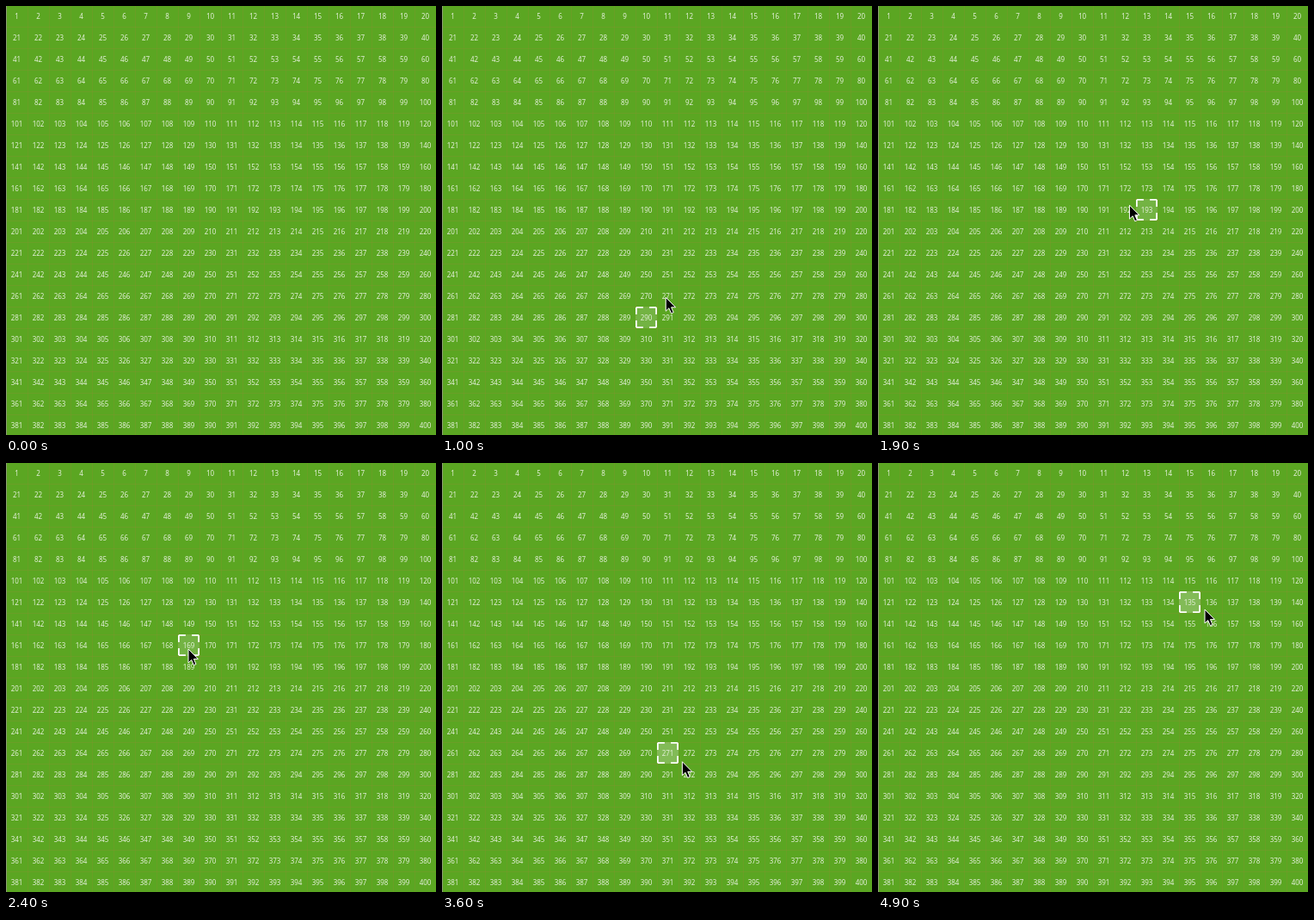
An HTML page for the animation above (5000 ms loop, 500 px wide and 498 px high).

```html
<!DOCTYPE html>
<html lang="en">
<head>
<meta charset="utf-8">
<title>Number grid</title>
<style>
  html, body { margin: 0; width: 100%; height: 100%; overflow: hidden; background: #5ba622; }
  svg { display: block; width: 100%; height: 100%; }
  text { font: 8px "Noto Sans", "Open Sans", sans-serif; fill: #e3efd9; text-anchor: middle; }
  .lines { fill: none; stroke: #8a8e32; stroke-opacity: .3; }
  .corners { fill: none; stroke: #fff; stroke-width: 1.8; stroke-dasharray: 8 7.2 8 0; }
  #pointer { fill: #000; stroke: #fff; stroke-width: 1; stroke-linejoin: round; }
</style>
</head>
<body>
<svg viewBox="0 0 500 498">
  <rect width="500" height="498" fill="#5ba622"/>
  <path id="lines" class="lines"/>
  <rect width="1" height="498" fill="#8b9d72"/>
  <g id="hover">
    <rect id="fill" width="25" height="25" fill="#fff"/>
  </g>
  <g id="labels"></g>
  <g id="frame"><rect class="corners" x=".9" y=".9" width="23.2" height="23.2"/></g>
  <path id="pointer" d="M0 0V16L3.7 12.6L6.3 18.7L9 17.5L6.4 11.6H11.4Z"/>
</svg>
<script>
const LOOP = 5000, STEP = 100, ENTER = 100, CELL = 25, COLS = 20, TOP = -1;
const $ = id => document.getElementById(id);

// Pointer stops: time, x, y
const stops = [
  [100, 150, 498], [400, 190, 415], [600, 196, 407], [1500, 350, 242],
  [2400, 212, 216], [3100, 234, 310], [4200, 339, 395], [4700, 368, 166], [4900, 380, 170]
];

function buildGrid() {
  let d = "";
  for (let i = 1; i < COLS; i++) {
    d += `M${i * CELL + .5} 0V498M0 ${i * CELL + TOP + .5}H500`;
  }
  $("lines").setAttribute("d", d);
  let labels = "";
  for (let n = 0; n < COLS * COLS; n++) {
    const x = (n % COLS) * CELL + 12.5;
    const y = Math.floor(n / COLS) * CELL + 14.5;
    labels += `<text x="${x}" y="${y}">${n + 1}</text>`;
  }
  $("labels").innerHTML = labels;
}

function pointerAt(t) {
  const i = Math.max(1, stops.findIndex(s => s[0] >= t));
  const [t0, x0, y0] = stops[i - 1], [t1, x1, y1] = stops[i];
  const u = Math.max(0, (t - t0) / (t1 - t0));
  const e = u * u * (3 - 2 * u);
  return [x0 + (x1 - x0) * e, y0 + (y1 - y0) * e];
}

function cellAt(t) {
  const [x, y] = pointerAt(t);
  return [Math.floor(x / CELL) * CELL, Math.floor((y - TOP) / CELL) * CELL + TOP];
}

const place = (el, [x, y]) => el.setAttribute("transform", `translate(${x} ${y})`);
const show = (el, on) => el.setAttribute("visibility", on ? "visible" : "hidden");

function draw(now) {
  const t = Math.floor((now % LOOP) / STEP) * STEP;
  const lag = t - STEP;
  show($("pointer"), t >= ENTER);
  show($("hover"), lag >= ENTER);
  show($("frame"), lag >= ENTER);
  place($("pointer"), pointerAt(t));

  // The highlight trails the pointer and brightens once it settles.
  const cell = cellAt(lag);
  const settled = String(cell) === String(cellAt(lag - STEP));
  place($("hover"), cell);
  place($("frame"), cell);
  $("fill").setAttribute("opacity", settled ? .24 : .15);
}

buildGrid();
draw(0);
let start;
requestAnimationFrame(function tick(now) {
  start ??= now;
  draw(now - start);
  requestAnimationFrame(tick);
});
</script>
</body>
</html>
```
